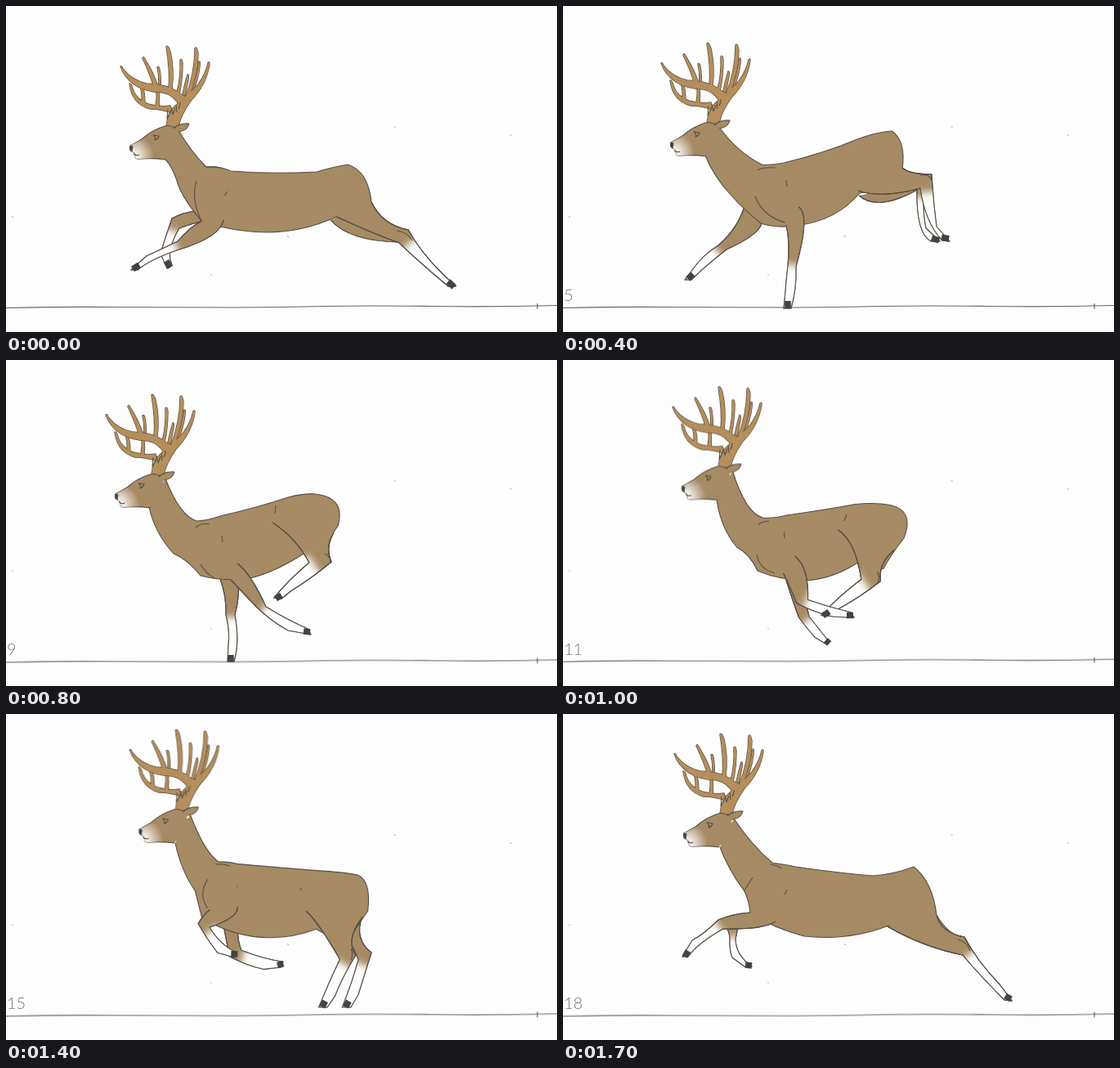
Recreate the animation shown at these times as an HTML page without scripts. Size 674 px wide and 399 px high, loop 1.8 s.

```html
<!DOCTYPE html>
<html lang="en">
<head>
<meta charset="utf-8">
<title>Running stag</title>
<style>
@property --n { syntax: "<integer>"; inherits: false; initial-value: 1; }
html, body { margin: 0; width: 100%; height: 100%; overflow: hidden; background: #fdfdfd; }
svg { display: block; position: absolute; left: 0; top: 0; }
svg * { animation: 1.8s steps(2) infinite; }
path { fill: none; stroke: #564f46; stroke-width: 1.1; stroke-linejoin: round; }
.coat { fill: #a68a63; }
.sock { stroke: #fefefe; stroke-width: 34; filter: url(#soft); }
.hoof { stroke: #434343; stroke-width: 7.5; animation-name: hoof; }
.antler { fill: #b58e5b; stroke-width: 1.4; paint-order: stroke; }
.seam { stroke: #a68a63; stroke-width: 13; }
.speck { stroke: #bbb; }
.body { animation-name: body; }
.marks { animation-name: marks; }
.head { animation-name: head; }
.ground { stroke: #666; animation-name: ground; }
.nf { animation-name: nf; } .nfs { animation-name: nfs; }
.ff { animation-name: ff; } .ffs { animation-name: ffs; }
.nh { animation-name: nh; } .nhs { animation-name: nhs; }
.fh { animation-name: fh; } .fhs { animation-name: fhs; }
.count {
  position: absolute; left: 1px; top: 340px; font: 300 20px/27px Lato, sans-serif; color: #777;
  counter-reset: n var(--n); animation: count 1.8s steps(18) infinite, blank 1.8s step-end infinite;
}
.count::after { content: counter(n); }
@keyframes count { from { --n: 1; } to { --n: 19; } }
@keyframes blank { 0% { opacity: 0; } 5.5556%, 100% { opacity: 1; } }

/* Key poses; steps() fills the drawings between them at ten per second. */
@keyframes head {
  0%, 100% { transform: translate(0, 0); }
  11.1111% { transform: translate(-1px, 9px); }
  22.2222% { transform: translate(-20px, -4px); animation-timing-function: steps(4); }
  44.4444% { transform: translate(-18px, -7px); animation-timing-function: steps(4); }
  66.6667% { transform: translate(6px, -26px); animation-timing-function: steps(3); }
  83.3333% { transform: translate(14px, -32px); }
  94.4444% { transform: translate(-4px, -25px); animation-timing-function: steps(1); }
}
@keyframes ground {
  0%, 100% { transform: translateY(0); }
  11.1111% { transform: translateY(1px); }
  22.2222% { transform: translateY(0); animation-timing-function: steps(4); }
  44.4444% { transform: translateY(.5px); animation-timing-function: steps(4); }
  66.6667% { transform: translateY(-1px); animation-timing-function: steps(3); }
  83.3333% { transform: translateY(1px); }
  94.4444% { transform: translateY(.5px); animation-timing-function: steps(1); }
}
@keyframes body {
  0%, 100% { d: path("M211 152Q226 178 245 197Q262 196 275 202Q325 206 380 203Q400 197 418 194Q443 202 447 240Q456 262 470 268Q440 275 404 258Q350 283 290 275Q264 272 239 263Q218 238 211 220Q204 196 194 187"); }
  11.1111% { d: path("M210 161Q226 180 250 201Q262 198 275 199Q340 194 380 184Q405 179 428 178Q445 194 441 224Q450 238 470 238Q430 258 384 246Q350 280 288 274Q262 276 239 272Q230 250 214 229Q206 210 193 196"); }
  22.2222% { d: path("M191 148Q212 178 243 194Q256 195 270 192Q320 180 360 163Q385 154 402 153Q420 165 415 200Q425 205 445 206Q400 225 363 229Q335 262 290 268Q262 273 242 266Q222 250 205 231Q184 208 174 183"); animation-timing-function: steps(4); }
  44.4444% { d: path("M195 145Q212 190 233 197Q245 197 262 191Q310 180 345 168Q365 163 378 164Q416 168 406 203Q390 225 397 245Q385 240 367 235Q330 260 295 268Q265 271 238 264Q222 244 205 237Q182 212 175 180"); animation-timing-function: steps(4); }
  66.6667% { d: path("M220 127Q235 185 256 189Q270 191 285 189Q330 187 370 185Q400 185 422 191Q445 200 428 233Q410 255 387 266Q375 270 358 258Q335 275 300 272Q265 268 238 252Q234 230 220 221Q204 200 201 162"); animation-timing-function: steps(3); }
  83.3333% { d: path("M228 121Q246 160 262 177Q272 175 285 181Q340 189 385 195Q420 198 434 200Q448 206 450 245Q440 262 437 277Q410 278 390 266Q350 278 305 273Q262 265 240 246Q234 225 237 214Q220 190 210 156"); }
  94.4444% { d: path("M209 128Q232 162 256 182Q270 184 285 187Q340 195 380 198Q405 196 429 187Q452 205 457 246Q468 265 480 270Q440 280 398 259Q350 278 295 272Q258 262 229 244Q228 230 222 217Q202 190 192 163"); animation-timing-function: steps(1); }
}
/* shoulder, rib, withers, hock, hip */
@keyframes marks {
  0%, 100% { d: path("M233 214Q226 235 239 263M267 232L271 227M245 197Q254 196 262 198M478 275Q490 276 497 287M330 230L330 230"); }
  11.1111% { d: path("M240 238Q238 262 262 273M283 234L286 227M250 201Q256 199 264 199M469 240Q481 239 484 247M330 220L330 220"); }
  22.2222% { d: path("M235 233Q245 258 272 265M273 213L274 221M238 201Q245 197 260 198M437 207Q448 205 451 213M330 190L330 190"); animation-timing-function: steps(4); }
  44.4444% { d: path("M238 250Q245 262 255 267M264 215L265 223M232 205Q238 199 249 201M390 237Q397 240 397 248M330 178L329 188"); animation-timing-function: steps(4); }
  66.6667% { d: path("M236 227Q237 252 263 254M277 206L277 213M246 198Q250 195 255 194M379 281Q378 290 374 297M364 200L359 206"); animation-timing-function: steps(3); }
  83.3333% { d: path("M252 190Q234 205 238 229M284 215L286 209M262 177Q272 177 283 182M443 290Q449 294 446 303M360 220L360 220"); }
  94.4444% { d: path("M222 216Q228 206 232 200M271 221L274 215M254 184Q262 185 267 189M483 276Q494 278 498 290M340 225L340 225"); animation-timing-function: steps(1); }
}
/* near fore, far fore, near hind, far hind */
@keyframes hoof {
  0%, 100% { d: path("M163 317L155 322M196 312L201 320M541 337L548 344M541 337L548 344"); }
  11.1111% { d: path("M219 361L216 369M160 324L156 332M523 307L532 310M523 307L532 310"); }
  22.2222% { d: path("M275 361L275 370M159 328L153 334M463 283L472 285M451 284L460 287"); animation-timing-function: steps(4); }
  44.4444% { d: path("M364 332L372 333M275 361L275 369M337 288L330 292M337 288L330 292"); animation-timing-function: steps(4); }
  66.6667% { d: path("M330 293L338 292M368 325L376 325M314 328L306 334M314 328L306 334"); animation-timing-function: steps(3); }
  83.3333% { d: path("M248 294L256 295M314 299L321 296M429 363L427 371M472 363L470 371"); }
  94.4444% { d: path("M153 290L149 297M223 307L231 308M541 345L548 349M541 345L548 349"); animation-timing-function: steps(1); }
}
@keyframes nf {
  0%, 100% { d: path("M240 263Q225 270 210 288Q185 300 172 306L153 323L161 323Q178 309 212 298Q262 283 266 262"); }
  11.1111% { d: path("M262 273Q255 297 240 319Q232 335 223 347L212 369L221 369Q230 350 246 324Q288 290 291 263"); }
  22.2222% { d: path("M273 268Q278 290 275 318Q273 335 272 350L270 370L279 370Q286 345 285 319Q303 255 288 246"); animation-timing-function: steps(4); }
  44.4444% { d: path("M275 269Q290 285 306 302Q325 320 345 331L373 336L369 329Q340 316 318 302Q300 262 283 249"); animation-timing-function: steps(4); }
  66.6667% { d: path("M264 253Q266 270 265 293Q290 298 315 297L339 295L336 289Q310 289 281 285Q302 245 284 231"); animation-timing-function: steps(3); }
  83.3333% { d: path("M242 233Q232 230 220 238Q224 265 231 290L249 299L256 294Q238 280 233 249Q275 252 283 239"); }
  94.4444% { d: path("M229 243Q205 245 190 252Q172 270 158 277L146 297L153 297Q165 280 196 263Q245 264 260 254"); animation-timing-function: steps(1); }
}
@keyframes nfs {
  0%, 100% { d: path("M208 294L175 309L157 321"); }
  11.1111% { d: path("M240 324L225 352L217 370"); }
  22.2222% { d: path("M280 317L278 345L275 371"); animation-timing-function: steps(4); }
  44.4444% { d: path("M315 304L345 326L372 333"); animation-timing-function: steps(4); }
  66.6667% { d: path("M278 290L312 293L338 292"); animation-timing-function: steps(3); }
  83.3333% { d: path("M229 259L236 285L254 297"); }
  94.4444% { d: path("M190 259L162 279L150 297"); animation-timing-function: steps(1); }
}
@keyframes ff {
  0%, 100% { d: path("M232 251Q215 253 203 260Q196 280 189 303L197 321L203 317Q195 300 212 272Q228 266 242 263"); }
  11.1111% { d: path("M250 272Q225 281 200 283Q178 292 166 306L153 332L160 332Q172 315 200 293Q230 292 252 295"); }
  22.2222% { d: path("M222 245Q214 272 190 293Q176 302 166 313L149 335L157 335Q174 318 200 298Q240 280 243 266"); animation-timing-function: steps(4); }
  44.4444% { d: path("M262 268Q270 290 269 312Q274 330 272 350L271 369L279 369Q286 345 280 312Q286 290 284 270"); animation-timing-function: steps(4); }
  66.6667% { d: path("M283 268Q292 300 308 318Q325 330 345 329L376 328L373 322Q345 320 322 316Q305 295 303 270"); animation-timing-function: steps(3); }
  83.3333% { d: path("M258 256Q259 270 256 286Q280 297 300 304L316 301L322 294Q300 290 271 276Q272 268 274 262"); }
  94.4444% { d: path("M200 261Q205 270 204 280Q204 290 207 298L222 309L231 309Q211 295 211 275Q213 268 214 259"); animation-timing-function: steps(1); }
}
@keyframes ffs {
  0%, 100% { d: path("M204 275L194 303L201 320"); }
  11.1111% { d: path("M197 290L168 312L155 332"); }
  22.2222% { d: path("M188 299L168 318L152 335"); animation-timing-function: steps(4); }
  44.4444% { d: path("M275 315L277 345L275 370"); animation-timing-function: steps(4); }
  66.6667% { d: path("M322 322L345 324L376 325"); animation-timing-function: steps(3); }
  83.3333% { d: path("M274 284L300 297L321 297"); }
  94.4444% { d: path("M207 273L210 297L229 307"); animation-timing-function: steps(1); }
}
@keyframes nh {
  0%, 100% { d: path("M447 240Q460 268 492 274Q506 300 533 327L550 343L541 343Q504 312 481 290Q440 275 405 258"); }
  11.1111% { d: path("M441 224Q452 240 482 238Q492 270 516 293L532 312L523 311Q497 298 480 261Q430 264 384 246"); }
  22.2222% { d: path("M415 198Q424 206 451 206Q453 240 457 270L473 288L464 287Q443 265 437 223Q390 236 361 226"); animation-timing-function: steps(4); }
  44.4444% { d: path("M400 213Q390 230 398 247Q375 266 348 283L337 292L328 291Q345 270 371 248Q355 218 326 199"); animation-timing-function: steps(4); }
  66.6667% { d: path("M410 252Q380 270 379 294Q355 312 326 326L313 335L304 334Q330 308 359 289Q360 225 347 217"); animation-timing-function: steps(3); }
  83.3333% { d: path("M449 247Q432 280 452 296Q438 330 441 354L433 371L422 371Q427 340 433 306Q395 272 377 253"); }
  94.4444% { d: path("M457 246Q462 268 491 273Q506 302 534 331L549 351L540 350Q512 322 489 295Q440 285 397 260"); animation-timing-function: steps(1); }
}
@keyframes nhs {
  0%, 100% { d: path("M494 290L530 332L548 344"); }
  11.1111% { d: path("M483 256L501 293L531 310"); }
  22.2222% { d: path("M445 228L448 262L471 286"); animation-timing-function: steps(4); }
  44.4444% { d: path("M379 253L345 277L330 291"); animation-timing-function: steps(4); }
  66.6667% { d: path("M362 296L330 318L306 334"); animation-timing-function: steps(3); }
  83.3333% { d: path("M442 313L434 345L427 372"); }
  94.4444% { d: path("M497 294L528 335L548 351"); animation-timing-function: steps(1); }
}
@keyframes fh {
  0%, 100% { d: path("M447 240Q460 268 492 274Q506 300 533 327L550 343L541 343Q504 312 481 289Q420 288 397 262"); }
  11.1111% { d: path("M441 224Q452 240 482 238Q492 270 516 293L532 312L523 311Q497 298 480 261Q412 270 383 247"); }
  22.2222% { d: path("M440 215Q442 218 441 224Q440 255 444 272L461 288L450 288Q432 278 433 225Q385 252 362 232"); animation-timing-function: steps(4); }
  44.4444% { d: path("M400 213Q390 230 398 247Q375 266 348 283L337 292L328 291Q345 270 371 248Q355 218 326 199"); animation-timing-function: steps(4); }
  66.6667% { d: path("M410 252Q380 270 379 294Q355 312 326 326L313 335L304 334Q330 308 359 289Q360 225 347 217"); animation-timing-function: steps(3); }
  83.3333% { d: path("M449 245Q448 278 481 291Q478 330 483 353L476 371L465 371Q470 340 467 306Q450 300 438 278"); }
  94.4444% { d: path("M457 246Q462 268 491 273Q506 302 534 331L549 351L540 350Q512 322 489 295Q440 285 397 260"); animation-timing-function: steps(1); }
}
@keyframes fhs {
  0%, 100% { d: path("M494 290L530 332L548 344"); }
  11.1111% { d: path("M483 256L501 293L531 310"); }
  22.2222% { d: path("M437 234L440 270L459 287"); animation-timing-function: steps(4); }
  44.4444% { d: path("M379 253L345 277L330 291"); animation-timing-function: steps(4); }
  66.6667% { d: path("M362 296L330 318L306 334"); animation-timing-function: steps(3); }
  83.3333% { d: path("M473 312L475 345L470 372"); }
  94.4444% { d: path("M497 294L528 335L548 351"); animation-timing-function: steps(1); }
}
</style>
</head>
<body>
<svg width="674" height="399" viewBox="0 0 674 399">
  <defs>
    <filter id="soft" filterUnits="userSpaceOnUse" x="0" y="0" width="674" height="399"><feGaussianBlur stdDeviation="5"/></filter>
    <radialGradient id="muzzle" gradientUnits="userSpaceOnUse" cx="155" cy="184" r="26">
      <stop offset="0" stop-color="#fefefe"/><stop offset=".3" stop-color="#fefefe" stop-opacity=".8"/>
      <stop offset="1" stop-color="#fefefe" stop-opacity="0"/>
    </radialGradient>
    <clipPath id="nfClip"><path class="nf"/></clipPath>
    <clipPath id="ffClip"><path class="ff"/></clipPath>
    <clipPath id="nhClip"><path class="nh"/></clipPath>
    <clipPath id="fhClip"><path class="fh"/></clipPath>
  </defs>

  <path class="speck" d="M474 148h3M616 158h3M8 257v2M344 281l2 2M250 329h2"/>
  <path class="ground" d="M0 369.500Q60 368 130 368.500T280 369Q340 368.500 390 367.500T520 367.500T674 366.500M650 364v7"/>

  <path class="fh coat"/><path class="fhs sock" clip-path="url(#fhClip)"/><path class="fh"/>
  <path class="ff coat"/><path class="ffs sock" clip-path="url(#ffClip)"/><path class="ff"/>
  <path class="body coat"/>
  <path class="nh coat"/><path class="nhs sock" clip-path="url(#nhClip)"/><path class="nh"/>
  <path class="nf coat"/><path class="nfs sock" clip-path="url(#nfClip)"/><path class="nf"/>
  <path class="hoof"/>
  <path class="marks"/>

  <g class="head">
    <path class="antler" d="M151 95Q154 95 155 102Q160 115 174 120Q188 124 201 122L203 131Q190 126 176 126Q154 120 151 95ZM166 118Q167 108 164 98Q166 95 168 100Q170 110 170 120ZM183 122Q185 112 184 103L187 104Q188 114 187 123Z"/>
    <path class="antler" d="M186 99Q188 88 185 75Q187 73 188 78Q190 90 189 99ZM216 108Q219 94 222 84Q224 83 223 90L219 110ZM224 108Q233 88 236 68Q238 67 237 74Q235 92 227 108Z"/>
    <path class="antler" d="M196 147Q198 130 207 122Q222 110 235 96Q244 84 247 70Q249 67 249 71Q245 97 226 116Q214 133 211 147ZM140 74Q142 73 143 77Q154 91 172 95Q198 96 211 106L226 115L213 123Q206 109 192 106Q170 105 158 97Q145 88 140 74ZM181 100Q177 85 167 64Q168 60 171 67Q182 84 186 100ZM199 101Q201 80 196 50Q198 47 201 56Q206 78 203 102ZM209 106Q214 88 213 66Q215 63 216 70Q216 90 212 108ZM219 113Q231 84 231 52Q233 48 235 58Q235 85 223 113Z"/>
    <path d="M198 126l-1 12 5-10M202 124l2 9 3-8M208 121l1 9M213 118q0 5-2 8"/>
    <path class="seam" d="M208 157L199 186"/>
    <path class="coat" d="M212 152Q200 145 194 147Q178 152 166 163L152 171Q150 176 156 179Q160 182 158 184Q158 188 165 187Q180 186 195 188"/>
    <path style="fill:url(#muzzle)" d="M194 147Q178 152 166 163L152 171Q150 176 156 179Q160 182 158 184Q158 188 165 187Q180 186 195 188" stroke-opacity="0"/>
    <path style="fill:#434343" d="M152 171L155 172L154 178Q150 176 152 171Z"/>
    <path d="M156 181Q160 184 163 182M180 158L187 159Q186 163 182 164Q184 161 180 158"/>
    <path class="coat" d="M205 150Q212 143 224 144Q222 153 211 154"/>
  </g>
</svg>
<div class="count"></div>
</body>
</html>
```
